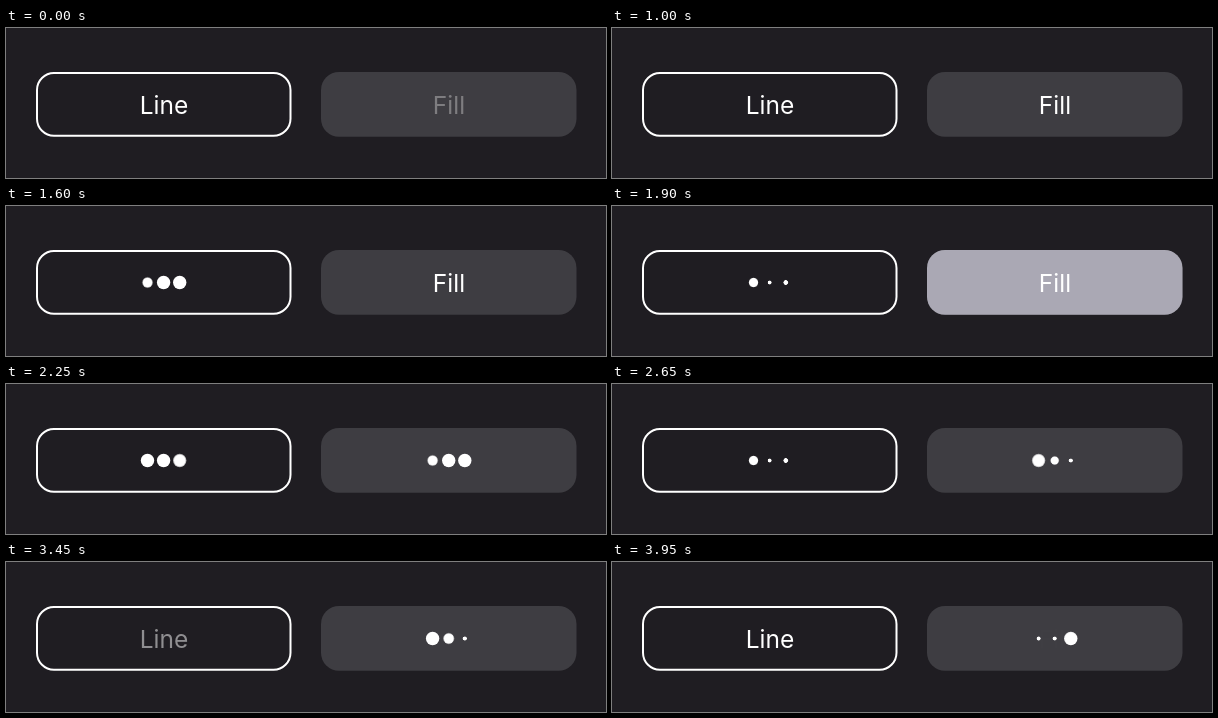
Write an HTML page that moves like this. It is 600 px wide and 150 px high and loops after 4000 ms.

```html
<!DOCTYPE html>
<html lang="en">
<head>
<meta charset="utf-8">
<title>Loading buttons</title>
<style>
  html, body { margin: 0; width: 100%; height: 100%; overflow: hidden; background: #1f1d22; }
  svg { display: block; width: 600px; height: 150px; }
  text { font: 400 24.5px Inter, "Open Sans", sans-serif; fill: #fff; text-anchor: middle; }
  circle { fill: #fff; }

  .line { --press: -2850ms; --swap: -2650ms; --pulse: -2450ms; }
  .fill { --press: -2200ms; --swap: -2050ms; --pulse: -1800ms; }

  .glow, .label, .dots, .dots circle { animation: 4s linear infinite; }
  .glow { fill: #aaa8b4; animation-name: press; animation-delay: var(--press); }
  .label { animation-name: label; animation-delay: var(--swap); }
  .dots { animation-name: dots; animation-delay: var(--swap); }
  .dots circle {
    animation-name: pulse;
    animation-delay: calc(var(--pulse) + var(--i) * 125ms);
    transform-box: fill-box;
    transform-origin: center;
  }

  @keyframes press {
    0%, 8.75%, 100% { opacity: 0; }
    2.5%, 3.75% { opacity: 1; }
  }
  @keyframes label {
    0%, 55%, 100% { opacity: 1; }
    3.75%, 50% { opacity: 0; }
  }
  @keyframes dots {
    0%, 1.25%, 50.31%, 100% { opacity: 0; }
    5%, 50.3% { opacity: 1; }
  }
  /* three 750 ms beats */
  @keyframes pulse {
    0%, 18.75%, 37.5% { transform: scale(1); animation-timing-function: ease-in-out; }
    3.125%, 21.875%, 40.625% { transform: scale(.3); }
    6.25%, 25%, 43.75% { transform: scale(.3); animation-timing-function: ease-out; }
    12.5%, 31.25%, 50%, 100% { transform: scale(1); }
  }
</style>
</head>
<body>
<svg viewBox="0 0 600 150">
  <g class="line">
    <rect class="glow" x="31" y="45" width="253.5" height="62.5" rx="17"/>
    <rect x="31" y="45" width="253.5" height="62.8" rx="17" fill="none" stroke="#fff" stroke-width="2"/>
    <text class="label" x="158" y="85.7">Line</text>
    <g class="dots">
      <circle cx="141.5" cy="76.5" r="6.7" style="--i:0"/>
      <circle cx="157.6" cy="76.5" r="6.7" style="--i:1"/>
      <circle cx="173.7" cy="76.5" r="6.7" style="--i:2"/>
    </g>
  </g>
  <g class="fill">
    <rect x="315" y="44" width="255.5" height="64.8" rx="18" fill="#3e3d42"/>
    <rect class="glow" x="315" y="44" width="255.5" height="64.8" rx="18"/>
    <text class="label" x="443" y="85.7">Fill</text>
    <g class="dots">
      <circle cx="426.6" cy="76.5" r="6.7" style="--i:0"/>
      <circle cx="442.7" cy="76.5" r="6.7" style="--i:1"/>
      <circle cx="458.8" cy="76.5" r="6.7" style="--i:2"/>
    </g>
  </g>
</svg>
</body>
</html>
```
